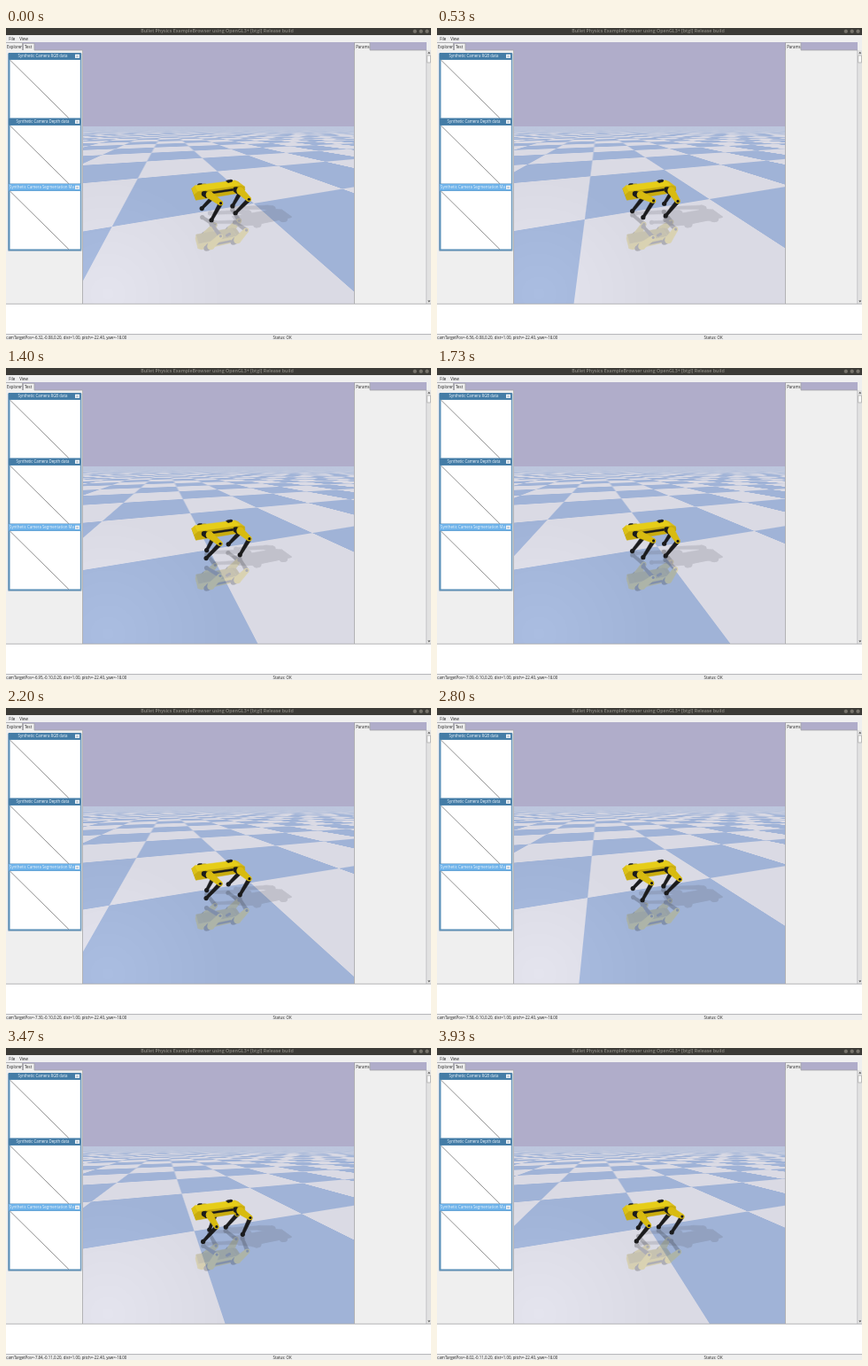
An HTML page with a canvas that plays this animation: 480x352 px, repeating every 3990 ms.

```html
<!DOCTYPE html>
<html lang="en">
<head>
<meta charset="utf-8">
<title>Walking robot in a physics viewer</title>
<style>
html, body { margin: 0; width: 100%; height: 100%; overflow: hidden; background: #b0adca; }
canvas, svg { position: absolute; left: 0; top: 0; width: 480px; height: 352px; }
text { font: 4.4px "Open Sans", "Noto Sans", sans-serif; fill: #222; }
.title { font-size: 5.3px; font-weight: 600; fill: #8b8982; text-anchor: middle; }
.cap { fill: #eef5fb; }
.panel { fill: #efefef; }
.edge { stroke: #a2a2a6; stroke-width: .8; fill: none; }
</style>
</head>
<body>
<canvas id="scene" width="480" height="352"></canvas>
<svg viewBox="0 0 480 352">
  <defs><clipPath id="capClip"><rect x="4" y="175" width="73" height="10"/></clipPath></defs>
  <rect width="480" height="8" fill="#3c3b37"/>
  <text class="title" x="238.5" y="5.4">Bullet Physics ExampleBrowser using OpenGL3+ [btgl] Release build</text>
  <g fill="#77746c" stroke="#2b2a27" stroke-width=".5">
    <circle cx="461.8" cy="3.7" r="2.5"/><circle cx="468.7" cy="3.7" r="2.5"/><circle cx="475.5" cy="3.7" r="2.5"/>
  </g>
  <rect class="panel" y="8" width="480" height="8"/>
  <text x="3.3" y="13.8">File</text><text x="15.3" y="13.8">View</text>

  <rect class="panel" y="25" width="87" height="287"/>
  <path class="panel" d="M0 16H18.5V26H0zM19.5 17.3H32V25H19.5z"/>
  <path class="edge" d="M18.5 25V16.5H0M19.5 25V17.3H32V25H86.5V311"/>
  <text x="1" y="22.6">Explorer</text><text x="21" y="23">Test</text>

  <g id="windows"></g>

  <rect class="panel" x="393" y="25" width="87" height="287"/>
  <path class="panel" d="M394 16H411V26H394zM475 16H480V26H475z"/>
  <path class="edge" d="M393.5 311V16.5H411V25H475V311"/>
  <text x="395.2" y="22.6">Params</text>
  <rect x="475.4" y="25" width="4.6" height="286" fill="#e2e2e2"/>
  <rect x="475.8" y="31" width="3.8" height="8" fill="#f8f8f8" stroke="#999" stroke-width=".6"/>
  <path d="M476.3 28.8l1.5-2 1.5 2zM476.3 307.5l1.5 2 1.5-2z" fill="#555"/>

  <rect y="311" width="480" height="35" fill="#fff"/>
  <path class="edge" d="M0 311.3H480"/>
  <rect class="panel" y="345.5" width="480" height="6.5"/>
  <path class="edge" d="M0 345.6H480"/>
  <text id="status" x=".3" y="350.6"></text>
  <text x="301.5" y="350.6">Status: OK</text>
</svg>
<script>
const W = 480, H = 352, LOOP = 3990;
const canvas = document.getElementById('scene');
const ctx = canvas.getContext('2d');
const layer = document.createElement('canvas');
layer.width = W; layer.height = H;
const pen = layer.getContext('2d');
const status = document.getElementById('status');

// Preview windows in the left panel
document.getElementById('windows').innerHTML =
  '<rect x="2" y="28" width="83.6" height="224" rx="1.5" fill="#9db4c8"/>' +
  '<rect x="2.7" y="28" width="82" height="223" rx="1" fill="#5b90b8"/>' +
  [['RGB data', 28, '#447ca6'], ['Depth data', 102, '#447ca6'], ['Segmentation Mask', 176, '#6db2ea']]
    .map(([name, y, color], i) => `
    <rect x="3" y="${y}" width="81.5" height="7.6" fill="${color}"/>
    <rect x="4.5" y="${y + 8}" width="79.3" height="65.5" fill="#fff"/>
    <path d="M4.6 ${y + 8.2}l66.2 65.3" stroke="#444" stroke-width=".6"/>
    <rect x="78" y="${y + 1.7}" width="5" height="4.2" fill="#eef3f8"/>
    <path d="M79.3 ${y + 4}h2.4" stroke="#678" stroke-width=".7"/>
    <text class="cap" ${i < 2 ? 'text-anchor="middle" x="41.5"' : 'x="4" clip-path="url(#capClip)"'}
      y="${y + 5.4}">Synthetic Camera ${name}</text>`).join('');

// Camera: 90 degree field of view, looking at the robot's base
const F = 172, CX = 241, CY = 181.5, BASE = 0.2;
const rad = Math.PI / 180;
const sinP = Math.sin(22.4 * rad), cosP = Math.cos(22.4 * rad);
const sinY = Math.sin(18 * rad), cosY = Math.cos(18 * rad);

// time, then camera target x, y, z
const track = [
  [0, -6.32, -0.08, 0.20], [1070, -6.81, -0.09, 0.19], [1730, -7.09, -0.10, 0.20],
  [2200, -7.30, -0.10, 0.20], [2800, -7.58, -0.10, 0.20], [3470, -7.84, -0.11, 0.20],
  [3930, -8.02, -0.11, 0.20]
];

function targetAt(ms) {
  let i = 0;
  while (i < track.length - 2 && track[i + 1][0] <= ms) i++;
  const a = track[i], b = track[i + 1], k = (ms - a[0]) / (b[0] - a[0]);
  return [1, 2, 3].map(j => a[j] + (b[j] - a[j]) * k);
}

// Points are relative to the robot: x, y on the ground, z above it
function project([x, y, z]) {
  const r = cosY * x - sinY * y, g = sinY * x + cosY * y, h = z - BASE;
  const depth = 1 + g * cosP - h * sinP;
  return [CX + F * r / depth, CY - F * (g * sinP + h * cosP) / depth];
}
const mirror = ([x, y, z]) => project([x, y, -z]);
const castShadow = ([x, y, z]) => project([x + 1.45 * z, y - 0.57 * z, 0]);

// Box-filtered square wave of period 2
const ramp = v => 1 - Math.abs(v - 2 * Math.floor(v / 2) - 1);
const wave = (v, w) => (ramp(v + w / 2) - ramp(v - w / 2)) / w;

const LEFT = 87, TOP = 110, floorImg = ctx.createImageData(306, 202);
const white = [218, 218, 228], blue = [160, 179, 215], sky = [176, 173, 202];

function drawFloor(tx, ty) {
  const { data, width, height } = floorImg, camH = BASE + sinP;
  for (let j = 0, o = 0; j < height; j++) {
    const py = TOP + j + 0.5, b = (CY - py) / F, drop = sinP - b * cosP;
    const s = camH / drop, g = -cosP + s * (cosP + b * sinP);
    const dr = s / F, dg = s * s / (camH * F);
    const wx = 0.75 * (dr * cosY + dg * sinY), wy = 0.75 * (dr * sinY + dg * cosY);
    for (let i = 0; i < width; i++, o += 4) {
      const px = LEFT + i + 0.5, r = s * (px - CX) / F;
      const mix = 0.5 + 0.5 * wave(tx + cosY * r + sinY * g, wx) * wave(ty - sinY * r + cosY * g, wy);
      const glow = 10 * Math.max(0, 1 - Math.hypot(px - 115, py - 300) / 130);
      for (let c = 0; c < 3; c++)
        data[o + c] = drop > 0 ? blue[c] + (white[c] - blue[c]) * mix + glow : sky[c];
      data[o + 3] = 255;
    }
  }
  ctx.putImageData(floorImg, LEFT, TOP);
}

function shape(pts, color) {
  pen.beginPath();
  pts.forEach(p => pen.lineTo(p[0], p[1]));
  pen.closePath();
  pen.fillStyle = pen.strokeStyle = color;
  pen.lineWidth = 0.5;
  pen.fill();
  pen.stroke();
}
function dot([x, y], r, color) {
  pen.beginPath();
  pen.arc(x, y, r, 0, 7);
  pen.fillStyle = color;
  pen.fill();
}
// Limb that narrows from width w0 to w1
function limb(a, b, w0, w1, color) {
  const dx = b[0] - a[0], dy = b[1] - a[1], len = Math.hypot(dx, dy) || 1;
  const nx = -dy / len / 2, ny = dx / len / 2;
  shape([[a[0] + nx * w0, a[1] + ny * w0], [b[0] + nx * w1, b[1] + ny * w1],
         [b[0] - nx * w1, b[1] - ny * w1], [a[0] - nx * w0, a[1] - ny * w0]], color);
  dot(a, w0 / 2, color);
  dot(b, w1 / 2, color);
}

const THIGH = 0.1, SHIN = 0.13, BLACK = '#1b1b1c';
const FRONT = -.085, REAR = .118;

function drawLeg(map, hipX, side, phase) {
  const a = phase * 2 * Math.PI, y = side * 0.066;
  const hip = [hipX, 0.198];
  const foot = [hipX - 0.008 - 0.038 * Math.cos(a), 0.016 + 0.024 * Math.max(0, -Math.sin(a))];
  const dx = foot[0] - hip[0], dz = hip[1] - foot[1], d = Math.hypot(dx, dz);
  const bend = Math.acos((THIGH ** 2 + d * d - SHIN ** 2) / (2 * THIGH * d));
  const angle = Math.atan2(dx, dz) + bend;
  const knee = [hip[0] + THIGH * Math.sin(angle), hip[1] - THIGH * Math.cos(angle)];
  const at = ([x, z]) => map([x, y, z]);
  const h = at(hip), k = at(knee), f = at(foot);
  limb(k, f, 4.6, 3, BLACK);
  dot(f, 2.6, BLACK);
  limb(at([hipX - .032, hip[1] + .012]), at([hipX - .012, hip[1]]), 6, 7, BLACK);
  limb(h, k, 8, 5.4, side < 0 ? '#d8bb10' : '#ab930c');
  dot(k, 1.6, BLACK);
}

// Side profile of the body, as x and height
const profile = [[-.165, .168], [-.173, .205], [-.15, .222], [.13, .227], [.156, .216], [.16, .19], [.12, .176]];

function drawBody(map, facing) {
  const near = profile.map(([x, z]) => map([x, -.052, z]));
  const far = profile.map(([x, z]) => map([x, .052, z]));
  const tones = ['#c4a80e', '#dcc114', '#e6cd18', '#dcc016', '#a58c0a', '#7c6a08', '#88740a'];
  near.forEach((p, i) => {
    const j = (i + 1) % near.length, q = near[j], u = far[i];
    const area = (q[0] - p[0]) * (u[1] - p[1]) - (q[1] - p[1]) * (u[0] - p[0]);
    if (area * facing <= 0) shape([p, q, far[j], u], tones[i]);
  });
  shape(near, '#c9ac0d');
  const onSide = (x, z) => map([x, -.053, z]);
  limb(onSide(-.07, .203), onSide(.07, .206), 2, 2, BLACK);
  limb(map([.075, .04, .229]), map([.105, .05, .229]), 2.6, 2.6, BLACK);
}

function drawRobot(map, facing, gait, alpha, flat) {
  pen.clearRect(0, 0, W, H);
  drawLeg(map, FRONT, 1, gait + 0.5);
  drawLeg(map, REAR, 1, gait);
  drawBody(map, facing);
  drawLeg(map, REAR, -1, gait + 0.5);
  drawLeg(map, FRONT, -1, gait);
  if (flat) {
    pen.globalCompositeOperation = 'source-in';
    pen.fillStyle = flat;
    pen.fillRect(0, 0, W, H);
    pen.globalCompositeOperation = 'source-over';
  }
  ctx.globalAlpha = alpha;
  ctx.drawImage(layer, 0, 0);
  ctx.globalAlpha = 1;
}

function render(ms) {
  const [tx, ty, tz] = targetAt(ms);
  const gait = (ms - 1070) / 400;
  ctx.fillStyle = `rgb(${sky})`;
  ctx.fillRect(0, 0, W, H);
  drawFloor(tx, ty);
  drawRobot(mirror, -1, gait, 0.23);
  drawRobot(castShadow, 0, gait, 0.18, '#55555f');
  drawRobot(project, 1, gait, 1);
  status.textContent = `camTargetPos=${tx.toFixed(2)},${ty.toFixed(2)},${tz.toFixed(2)}, ` +
    'dist=1.00, pitch=-22.40, yaw=-18.00';
}

// Fifteen steps a second, on a 10 ms grid
function stepStart(ms) {
  const rest = ms % 200;
  return ms - rest + (rest < 70 ? 0 : rest < 130 ? 70 : 130);
}

let shown = -1;
const begin = performance.now();
function tick() {
  const at = stepStart((performance.now() - begin) % LOOP);
  if (at !== shown) render(shown = at);
  requestAnimationFrame(tick);
}
tick();
</script>
</body>
</html>
```
